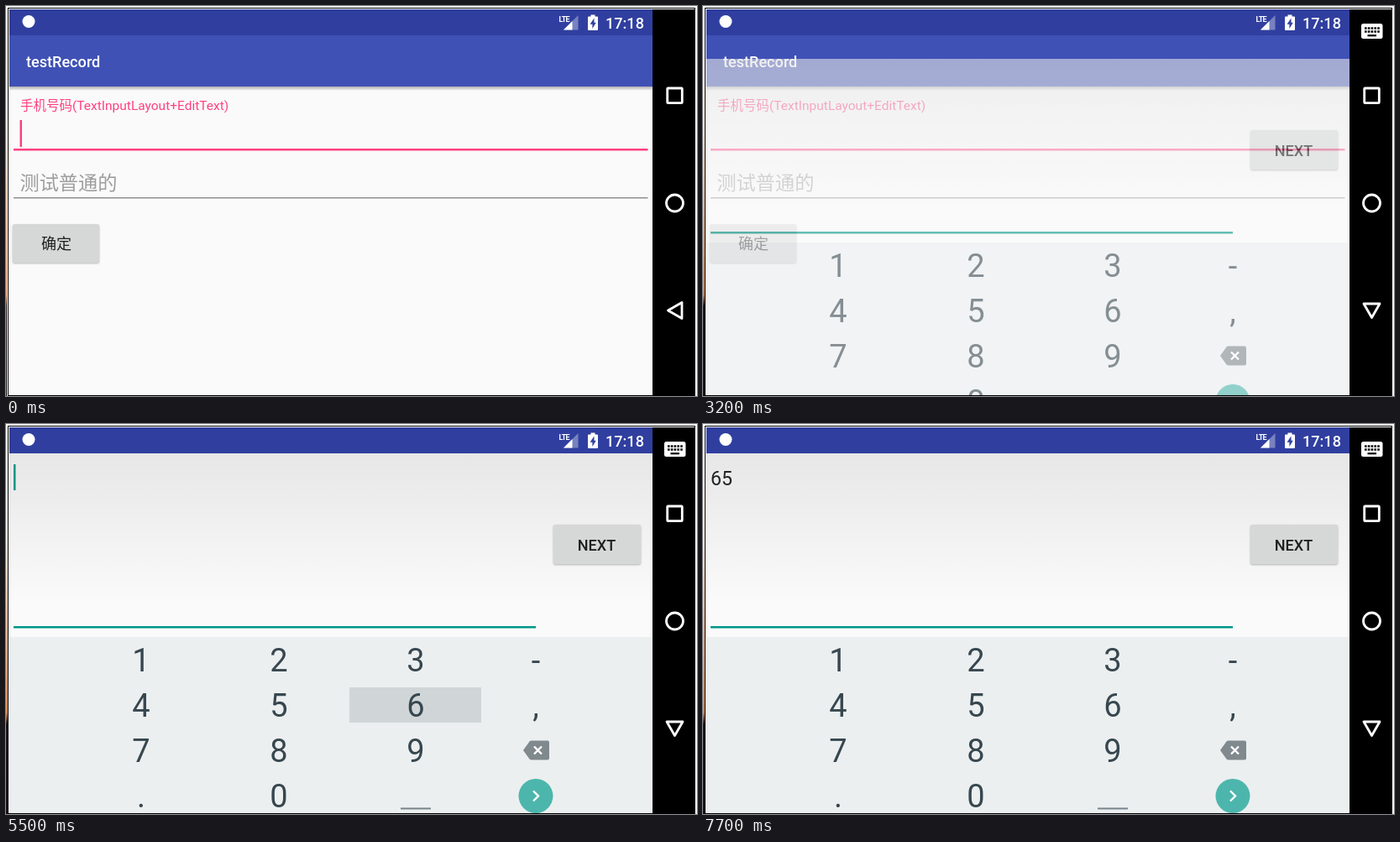
Write an HTML page that moves like this. It is 823 px wide and 465 px high and loops after 8000 ms.

```html
<!DOCTYPE html>
<html lang="zh-CN">
<head>
<meta charset="utf-8">
<title>testRecord</title>
<style>
html, body { margin: 0; width: 100%; height: 100%; overflow: hidden; background: #fff; }
svg { display: block; width: 823px; height: 465px; }
text { font-family: Roboto, "Noto Sans CJK SC", "Noto Sans CJK", sans-serif; }
.medium { font-size: 18.1px; font-weight: 500; }
.field { font-size: 23.2px; }
.keys { font-size: 38px; fill: #37474f; text-anchor: middle; }
.mid { text-anchor: middle; }
.button { fill: #d6d7d7; filter: drop-shadow(0 1px 1px rgba(0,0,0,.28)); }
.line { fill: none; stroke: #fff; stroke-width: 2.8; }

.anim { animation: 8s step-end infinite; }
.caret { animation-name: caret; }
.desk { animation-name: desk; }
.before { animation-name: before; }
.after { animation-name: after; }
.ime { animation-name: ime; }
.blink { animation-name: blink; }
.move { animation-name: move; }
.press6 { animation-name: press6; }
.press5 { animation-name: press5; }
.typed6 { animation-name: typed6; }
.typed5 { animation-name: typed5; }

@keyframes caret {
  0%, 11.25%, 22.5%, 33.75% { opacity: 1; }
  5%, 17.5%, 28.75%, 40%, 100% { opacity: 0; }
}
@keyframes desk { 0% { opacity: 0; } 36.25%, 100% { opacity: 1; } }
@keyframes before { 0% { opacity: 1; } 40%, 100% { opacity: 0; } }
@keyframes after { 0% { opacity: 0; } 40%, 100% { opacity: 1; } }
@keyframes ime {
  0% { opacity: 0; transform: translateY(28px); }
  40% { opacity: .6; transform: translateY(28px); }
  41.25% { opacity: .95; transform: translateY(.8px); }
  42.5% { opacity: .99; transform: none; }
  43.75%, 100% { opacity: 1; transform: none; }
}
@keyframes blink {
  0%, 48.75%, 58.75%, 83.75%, 96.25%, 100% { opacity: 0; }
  42.5%, 53.75%, 66.25%, 90% { opacity: 1; }
}
@keyframes move {
  0% { transform: none; }
  70% { transform: translateX(12.5px); }
  77.5%, 100% { transform: translateX(25px); }
}
@keyframes press6 { 0%, 71.25%, 100% { opacity: 0; } 68.75% { opacity: 1; } }
@keyframes press5 { 0%, 78.75%, 100% { opacity: 0; } 76.25% { opacity: 1; } }
@keyframes typed6 { 0% { opacity: 0; } 70%, 100% { opacity: 1; } }
@keyframes typed5 { 0% { opacity: 0; } 77.5%, 100% { opacity: 1; } }
</style>
</head>
<body>
<svg viewBox="0 0 823 465">
  <defs>
    <linearGradient id="deskFill" x2="0" y2="1">
      <stop offset="0" stop-color="#fff"/>
      <stop offset=".3" stop-color="#f3e6dc"/>
      <stop offset=".74" stop-color="#d98a55"/>
      <stop offset=".77" stop-color="#1c1214"/>
      <stop offset="1" stop-color="#120c10"/>
    </linearGradient>
    <linearGradient id="shade" x2="0" y2="1">
      <stop offset="0" stop-color="#e7e7e7"/>
      <stop offset=".8" stop-color="#fafafa"/>
    </linearGradient>
    <linearGradient id="drop" x2="0" y2="1">
      <stop offset="0" stop-color="#000" stop-opacity=".3"/>
      <stop offset="1" stop-color="#000" stop-opacity="0"/>
    </linearGradient>
    <clipPath id="screen"><rect x="4" y="35" width="766" height="429"/></clipPath>
  </defs>

  <!-- window edge -->
  <rect width="823" height="465" fill="#fff"/>
  <rect width="1" height="465" fill="url(#deskFill)"/>
  <rect class="anim desk" x="1" width="1" height="465" fill="url(#deskFill)"/>
  <path d="M2 2H821V465H2z"/>
  <path d="M3 3H820V464H3z" fill="#fff"/>

  <!-- form -->
  <rect x="4" y="35" width="766" height="429" fill="#fafafa"/>
  <rect x="4" y="35" width="766" height="61" fill="#3f51b5"/>
  <rect x="4" y="96" width="766" height="5" fill="url(#drop)"/>
  <text class="medium" x="24" y="73" fill="#fff">testRecord</text>
  <text x="17" y="124" font-size="15.5" fill="#ff4081">手机号码(TextInputLayout+EditText)</text>
  <rect class="anim caret" x="16.5" y="136" width="2.5" height="32" fill="#ff4081"/>
  <rect x="9" y="170" width="755.5" height="2.5" fill="#ff4081"/>
  <text class="field" x="16.5" y="219" fill="#9d9d9d">测试普通的</text>
  <rect x="9" y="228" width="755.5" height="1.5" fill="#8f8f8f"/>
  <rect class="button" x="8" y="260" width="103" height="46" rx="2.5"/>
  <text class="mid" x="60" y="290" font-size="18.1" fill="#1f1f1f">确定</text>

  <!-- full-screen input -->
  <g clip-path="url(#screen)">
    <g class="anim ime">
      <rect x="4" y="35" width="766" height="219" fill="url(#shade)"/>
      <g class="field" fill="#212121">
        <text class="anim typed6" x="9" y="73">6</text>
        <text class="anim typed5" x="22" y="73">5</text>
      </g>
      <g class="anim move">
        <rect class="anim blink" x="9" y="48" width="2.5" height="31" fill="#009688"/>
      </g>
      <rect x="9" y="241" width="622" height="2.5" fill="#009688"/>
      <rect class="button" x="652" y="120" width="104" height="47" rx="2.5"/>
      <text class="medium mid" x="703.5" y="150.5" fill="#1f1f1f">NEXT</text>

      <rect x="4" y="254" width="766" height="211" fill="#eceff0"/>
      <rect class="anim press6" x="409" y="314" width="157" height="42" fill="#d0d5d7"/>
      <rect class="anim press5" x="246" y="314" width="157" height="42" fill="#d0d5d7"/>
      <g class="keys">
        <text x="161" y="295">1</text><text x="325" y="295">2</text><text x="488" y="295">3</text><text x="631" y="295">-</text>
        <text x="161" y="349">4</text><text x="325" y="349">5</text><text x="488" y="349">6</text><text x="631" y="349">,</text>
        <text x="161" y="403">7</text><text x="325" y="403">8</text><text x="488" y="403">9</text>
        <text x="161" y="457">.</text><text x="325" y="457">0</text>
      </g>
      <rect x="470" y="457.5" width="36" height="2" fill="#76838a"/>
      <path d="M616 389L623.5 378.5Q624.5 377.5 626 377.5H645Q647 377.5 647 379.5V398.5Q647 400.5 645 400.5H626Q624.5 400.5 623.5 399.5z" fill="#80898d"/>
      <path d="M629 384.5l9 9m0-9l-9 9" class="line" style="stroke-width:2.4"/>
      <circle cx="631" cy="443.5" r="20.5" fill="#4db6ac"/>
      <path d="M628 437.5l6 6-6 6" class="line" style="stroke-width:2.4"/>
    </g>
  </g>

  <!-- status bar -->
  <rect x="4" y="4" width="766" height="31" fill="#303f9f"/>
  <circle cx="27" cy="18.5" r="7.5" fill="#fff"/>
  <path d="M681.5 11V28.5H664z" fill="#fff" opacity=".35"/>
  <path d="M674.5 18V28.5H664z" fill="#fff"/>
  <text x="658.5" y="18.5" font-size="9" font-weight="700" textLength="13" lengthAdjust="spacing" fill="#fff">LTE</text>
  <path d="M696.5 10.5H701.5V12.5H704Q705 12.5 705 13.5V28Q705 29 704 29H694Q693 29 693 28V13.5Q693 12.5 694 12.5H696.5z" fill="#fff"/>
  <path d="M700.5 14.5L695.5 21.8H698.4V27L702.8 19.8H700.5z" fill="#303f9f"/>
  <text class="medium" x="714" y="26.5" fill="#fff">17:18</text>

  <!-- navigation bar -->
  <rect x="770" y="4" width="50" height="460"/>
  <rect class="line" x="787.7" y="98" width="17.6" height="17.6" rx=".8"/>
  <circle class="line" cx="796.5" cy="235" r="10"/>
  <path class="line anim before" stroke-linejoin="round" d="M788.5 363L805 353.5V372.5z"/>
  <g class="anim after">
    <path class="line" stroke-linejoin="round" d="M787 355H806L796.5 371.5z"/>
    <rect x="784" y="21" width="25.5" height="18" rx="2.5" fill="#fff"/>
    <path d="M788 26.5H806M788 30.5H806" stroke="#000" stroke-width="2.4" stroke-dasharray="2.6 1.2"/>
    <path d="M791.5 35.2H802" stroke="#000" stroke-width="2.2"/>
  </g>
</svg>
</body>
</html>
```
